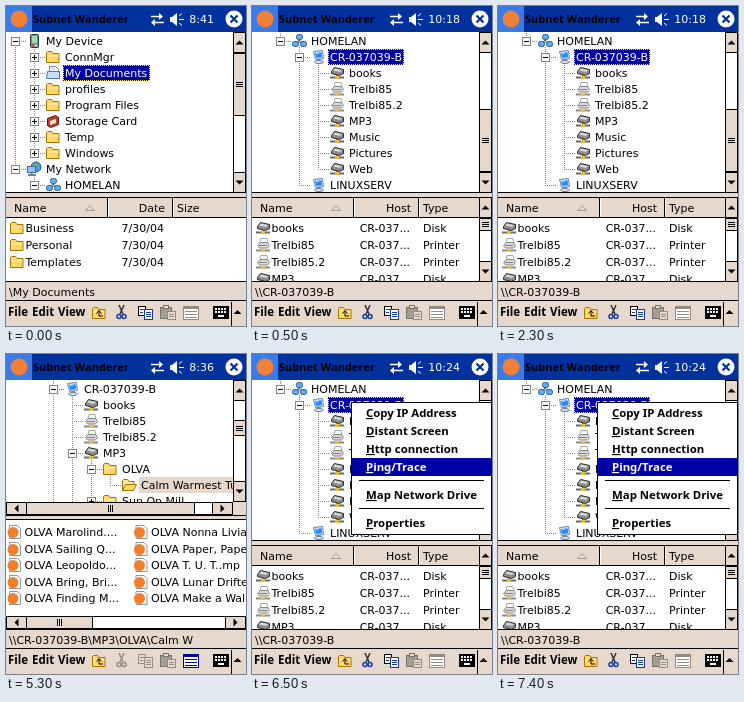
An HTML page for the animation above (8000 ms loop, 240 by 320 pixels).

```html
<!DOCTYPE html>
<html lang="en">
<head>
<meta charset="utf-8">
<title>Subnet Wanderer</title>
<style>
  html, body { margin: 0; width: 100%; height: 100%; overflow: hidden; background: #fff; }
  svg { display: block; }
  text { font: 11px "DejaVu Sans", sans-serif; white-space: pre; }
  .title, .bar, .menu { font-family: "Noto Sans", sans-serif; font-weight: 700; }
  .title { font-size: 11px; }
  .bar { font-size: 11.5px; }
  .menu { font-size: 11.4px; }
  .key { text-decoration: underline; }
  .end { text-anchor: end; }
  .crisp { shape-rendering: crispEdges; }
</style>
</head>
<body>
<svg id="stage" width="240" height="320" viewBox="0 0 240 320">
  <defs>
    <g id="folder">
      <path d="M1.5 13.5v-10l1-1h4l1.5 2h6v9z" fill="#ffd76b" stroke="#a57300"/>
      <path d="M2.5 7h11" stroke="#fff3b5"/>
    </g>
    <g id="open">
      <path d="M1.5 13.5v-10l1-1h4l1.5 2h5v3" fill="#ffe79c" stroke="#a57300"/>
      <path d="M1.5 13.5l3-6h11l-3 6z" fill="#ffd76b" stroke="#a57300"/>
    </g>
    <g id="docs">
      <path d="M4.5 8V1.5h6l3 3V8" fill="#fff" stroke="#6b84b5"/>
      <path d="M1.5 13.5l1-7h12v7z" fill="#c6dbff" stroke="#5273ad"/>
      <path d="M6 4h4" stroke="#9cb5de"/>
    </g>
    <g id="pda">
      <rect x="4.5" y="1.5" width="8" height="13" rx="1" fill="#8c8c94" stroke="#31313a"/>
      <rect x="6" y="3" width="5" height="7" fill="#9cdbb5"/>
      <path d="M6 12.5h2" stroke="#e73121" stroke-width="2"/>
      <path d="M9 12.5h2" stroke="#fff"/>
    </g>
    <g id="card">
      <path d="M2.5 5.5l8-3 3 2v7l-8 3-3-2z" fill="#c63929" stroke="#4a1810"/>
      <path d="M5 8l6-2v4l-6 2z" fill="#efe7de"/>
    </g>
    <g id="globe">
      <circle cx="10" cy="6" r="5" fill="#4a9cef" stroke="#185aa5"/>
      <path d="M7 4q3-3 5 0l-2 3zM12 8l2-2v3z" fill="#63bd52"/>
      <rect x="1.5" y="5.5" width="8" height="6" fill="#8cc6ff" stroke="#52637b"/>
      <path d="M2 14h8M5.5 12v2" stroke="#73848c" stroke-width="2"/>
    </g>
    <g id="group">
      <path d="M8 5v5M4 11L8 7l5 4" fill="none" stroke="#52637b"/>
      <g fill="#5aadf7" stroke="#315a8c">
        <rect x="5.5" y="1.5" width="6" height="5" rx="2"/>
        <rect x="1.5" y="8.5" width="6" height="5" rx="2"/>
        <rect x="9.5" y="8.5" width="6" height="5" rx="2"/>
      </g>
    </g>
    <g id="pc">
      <path d="M3.5 2.5l9-1 1 8-8 1z" fill="#d6e7ff" stroke="#6b84ad"/>
      <path d="M5 4l6.500-.8 .7 5-6 .8z" fill="#218cf7"/>
      <path d="M6 4.500l3-.4" stroke="#b5deff"/>
      <path d="M9 10v2" stroke="#6b7b9c" stroke-width="3"/>
      <ellipse cx="9" cy="13" rx="4.500" ry="1.500" fill="#dee7f7" stroke="#6b7b9c"/>
    </g>
    <g id="share">
      <path d="M2.5 6.500l3-4 9 2v4l-4 2-8-2z" fill="#8c8c8c" stroke="#292929"/>
      <path d="M4 5.500l2-2 7 1.500-2 2z" fill="#d6d6d6"/>
      <path d="M1 12.500h14M8 10v3" stroke="#6b6b6b" stroke-width="2"/>
      <path d="M6 12.500h4" stroke="#efbd31" stroke-width="3"/>
    </g>
    <g id="printer">
      <path d="M5 6l1-4.500h6L13 6" fill="#fff" stroke="#a5a5a5"/>
      <path d="M2.500 8.500l3-3h7l2 3-2 2.500h-8z" fill="#dedbd6" stroke="#848484"/>
      <path d="M4 8.500h8" stroke="#848484"/>
      <path d="M1 13.500h14" stroke="#8c8c84" stroke-width="2"/>
      <path d="M6 13.500h4" stroke="#efbd31" stroke-width="2"/>
    </g>
    <g id="song">
      <path d="M3.500 1.500h8l3 3v10h-11z" fill="#fff" stroke="#8c949c"/>
      <circle cx="7" cy="8.500" r="5.500" fill="#f0802c"/>
    </g>
  </defs>
</svg>
<script>
const FACE = '#e7d8ce', SHADE = '#848284', BLUE = '#00319c', PICK = '#0000a5';
const LOOP = 8000;
const BTN = 21; // scroll button length

const rect = (x, y, w, h, fill, more = '') =>
  `<rect class="crisp" x="${x}" y="${y}" width="${w}" height="${h}" fill="${fill}" ${more}/>`;
const box = (x, y, w, h, fill, stroke = '#000', more = '') =>
  rect(x + .5, y + .5, w - 1, h - 1, fill, `stroke="${stroke}" ${more}`);
const path = (d, stroke, more = '') => `<path d="${d}" fill="none" stroke="${stroke}" ${more}/>`;
const shape = (d, fill) => `<path d="${d}" fill="${fill}"/>`;
const text = (x, y, s, cls = '', fill = '') =>
  `<text x="${x}" y="${y}" class="${cls}"${fill && ` fill="${fill}"`}>${s}</text>`;
const icon = (id, x, y) => `<use href="#${id}" x="${x}" y="${y}"/>`;
const dots = d => path(d, SHADE, 'class="crisp" stroke-dasharray="1 1"');
const shift = (x, y, body) => `<g transform="translate(${x} ${y})">${body}</g>`;

let clips = 0;
function clip(x, y, w, h, body) {
  const id = 'clip' + clips++;
  return `<clipPath id="${id}"><rect x="${x}" y="${y}" width="${w}" height="${h}"/></clipPath>` +
    `<g clip-path="url(#${id})">${body}</g>`;
}

// Tree rows: level, icon, label, expander
const device = [
  [0, 'pda', 'My Device', '-'],
  [1, 'folder', 'ConnMgr', '+'],
  [1, 'docs', 'My Documents', '+'],
  [1, 'folder', 'profiles', '+'],
  [1, 'folder', 'Program Files', '+'],
  [1, 'card', 'Storage Card', '+'],
  [1, 'folder', 'Temp', '+'],
  [1, 'folder', 'Windows', '+'],
  [0, 'globe', 'My Network', '-'],
  [1, 'group', 'HOMELAN', '-'],
  [2, 'pc', 'CR-037039-B', '-'],
  [3, 'share', 'books'],
  [3, 'printer', 'Trelbi85'],
  [3, 'printer', 'Trelbi85.2'],
  [3, 'share', 'MP3'],
  [3, 'share', 'Music'],
  [3, 'share', 'Pictures'],
  [3, 'share', 'Web'],
  [2, 'pc', 'LINUXSERV']
];
const opened = device.slice();
opened.splice(14, 1,
  [3, 'share', 'MP3', '-'],
  [4, 'folder', 'OLVA', '-'],
  [5, 'open', 'Calm Warmest Tunes'],
  [4, 'folder', 'Sun On Mill', '+']);

function hasNext(rows, i, level) {
  const next = rows.slice(i + 1).find(r => r[0] <= level);
  return !!next && next[0] === level;
}

function tree(rows, from, bottom, picked, pickEnd, focus = true) {
  let out = '';
  rows.slice(from, from + 10).forEach(([level, pic, label, sign], k) => {
    const i = from + k, y = 27 + 16 * k, mid = y + 8, x = 9 + 19 * level;
    for (let l = 0; l < level; l++)
      if (hasNext(rows, i, l)) out += dots(`M${9.5 + 19 * l} ${y}v16`);
    if (i) out += dots(`M${x + .5} ${y}v8`);
    if (hasNext(rows, i, level)) out += dots(`M${x + .5} ${mid}v8`);
    out += dots(`M${x} ${mid + .5}h11`);
    if (sign === '-') out += dots(`M${x + 19.5} ${y + 14}v2`);
    if (sign) {
      out += box(x - 4, mid - 4, 9, 9, '#fff', SHADE) + rect(x - 2, mid, 5, 1, '#000');
      if (sign === '+') out += rect(x, mid - 2, 1, 5, '#000');
    }
    out += icon(pic, x + 11, y);
    const on = i === picked, tx = x + 31;
    if (on) {
      out += rect(tx - 2, y, pickEnd - tx + 2, 16, focus ? PICK : FACE);
      if (focus) out += box(tx - 2, y, pickEnd - tx + 2, 16, 'none', '#ffdf63', 'stroke-dasharray="1 1"');
    }
    out += text(tx, y + 12, label, '', on && focus ? '#fff' : '');
  });
  return clip(0, 26, 227, bottom - 26, out);
}

const arrow = (cx, cy, turn) =>
  `<path d="M-4 2h8l-4-4z" transform="translate(${cx} ${cy}) rotate(${turn})"/>`;

function vScroll(y, h, a, b) {
  const mid = (a + b) / 2 | 0;
  return box(227, y, 13, h, '#fff') +
    box(227, y, 13, BTN, FACE) + box(227, y + h - BTN, 13, BTN, FACE) + box(227, a, 13, b - a, FACE) +
    path(`M230 ${mid - 1.5}h7m-7 2h7m-7 2h7`, '#000', 'class="crisp"') +
    arrow(233.5, y + BTN / 2, 0) + arrow(233.5, y + h - BTN / 2, 180);
}

function hScroll(y, w, a, b) {
  const mid = (a + b) / 2 | 0;
  return box(0, y, w, 13, '#fff') +
    box(0, y, BTN, 13, FACE) + box(w - BTN, y, BTN, 13, FACE) + box(a, y, b - a, 13, FACE) +
    path(`M${mid - 1.5} ${y + 3}v7m2-7v7m2-7v7`, '#000', 'class="crisp"') +
    arrow(BTN / 2, y + 6.5, -90) + arrow(w - BTN / 2, y + 6.5, 90);
}

function titleBar(time) {
  const status = path('M145 10.5h10M148 16.5h10', '#fff', 'stroke-width="1.6"') +
    shape('M153 7l4 3.5-4 3.5zM149 13l-4 3.5 4 3.5z', '#fff') +
    shape('M164 11h2l5-4v13l-5-4h-2z', '#fff') +
    path('M173 13.5h5M173 10l3-2.5M173 17l3 2.5', '#fff');
  return rect(0, 0, 240, 26, BLUE) + rect(0, 0, 26, 26, '#3a7be7') +
    '<circle cx="13" cy="13" r="8.5" fill="#f08038"/>' +
    text(27, 17, 'Subnet Wanderer', 'title') +
    shift(7 * (4 - time.length), 0, status) +
    text(208, 17, time, 'end', '#fff') +
    '<circle cx="228" cy="13" r="8.5" fill="#fff"/>' +
    path('M224.5 9.500l7 7m0-7l-7 7', BLUE, 'stroke-width="2.2"');
}

// The edit buttons and the list button are never enabled together
function toolBar(editing) {
  const gray = '#948c84', ink = editing ? '#1839a5' : gray, page = editing ? '#fff' : FACE;
  const list = editing ? gray : '#0000a5';
  return rect(0, 295, 240, 25, FACE) + rect(0, 294, 240, 1, '#000') +
    text(2, 310, 'File', 'bar') + text(26, 310, 'Edit', 'bar') + text(52, 310, 'View', 'bar') +
    icon('folder', 85, 299) + path('M93 310v-5m-2.5 2.5L93 304.500l2.5 3M93 310h4', '#000') +
    path('M113 299l4 9M118 299l-4 9', editing ? '#31313a' : gray, 'stroke-width="1.5"') +
    `<g fill="none" stroke="${ink}" stroke-width="1.5"><circle cx="113" cy="310.500" r="2"/><circle cx="118" cy="310.500" r="2"/></g>` +
    box(132, 300, 8, 10, page, editing ? '#000' : gray) + box(138, 303, 9, 11, page, ink) +
    path('M134 303.500h4M134 306.500h3M140 306.500h5M140 308.500h5M140 310.500h5', ink) +
    box(154, 301, 12, 12, '#a59c94', '#73736b') + box(157, 299, 6, 4, FACE, '#73736b') +
    box(161, 305, 9, 9, FACE, gray) + path('M163 308.500h5M163 310.500h5', gray) +
    box(177, 300, 16, 14, '#fff', list) + rect(177, 300, 16, 3, list) +
    path('M179 305.500h12M179 308.500h12M179 311.500h12', list, 'class="crisp"') +
    box(207, 300, 16, 13, '#000') +
    path('M209 303h12M209 306h12', '#fff', 'stroke-width="2" stroke-dasharray="2 1"') +
    path('M212 310h6', '#fff', 'stroke-width="2"') +
    rect(225, 296, 1, 24, '#000') + arrow(231.5, 306, 0);
}

const pathBar = s => rect(0, 276, 240, 18, FACE) + rect(0, 275, 240, 1, '#000') + text(3, 290, s);

function header(mid, last, right) {
  let out = rect(0, 187, 240, 4, FACE) + rect(0, 186, 240, 1, '#000') + rect(0, 191, 240, 1, '#000') +
    rect(0, 192, right, 20, FACE) + rect(0, 211, right, 1, '#000');
  for (const x of [101, 166]) out += rect(x, 192, 1, 20, '#000') + rect(x + 1, 192, 1, 19, '#fff');
  return out + text(8, 206, 'Name') + text(159, 206, mid, 'end') + text(171, 206, last) +
    path('M79.5 204.500h9l-4.500-5z', '#a59c94');
}

function fileList(rows) {
  return clip(0, 212, 227, 63, rows.map(([pic, name, mid, last], i) => {
    const y = 226 + 17 * i;
    return icon(pic, 3, y - 12) + text(19.5, y, name) + text(158, y, mid, 'end') + text(171, y, last);
  }).join(''));
}

const day = '7/30/04', host = 'CR-037...';

function deviceView() {
  return titleBar('8:41') + tree(device, 0, 186, 2, 144) + vScroll(26, 161, 47, 110) +
    header('Date', 'Size', 240) +
    fileList(['Business', 'Personal', 'Templates'].map(s => ['folder', s, day, ''])) +
    pathBar('\\My Documents') + toolBar(true);
}

function hostView(time) {
  return titleBar(time) + tree(device, 9, 186, 10, 152) + vScroll(26, 161, 103, 166) +
    header('Host', 'Type', 227) +
    fileList([
      ['share', 'books', host, 'Disk'],
      ['printer', 'Trelbi85', host, 'Printer'],
      ['printer', 'Trelbi85.2', host, 'Printer'],
      ['share', 'MP3', host, 'Disk']
    ]) +
    vScroll(191, 85, 212, 225) + pathBar('\\\\CR-037039-B') + toolBar(true);
}

function musicView() {
  const columns = [
    ['Marolind....', 'Sailing Q...', 'Leopoldo...', 'Bring, Bri...', 'Finding M...'],
    ['Nonna Livia', 'Paper, Paper', 'T. U. T..mp', 'Lunar Drifter', 'Make a Walk']
  ];
  const songs = columns.map((names, c) => names.map((s, i) => {
    const x = 126.5 * c, y = 182 + 16.6 * i;
    return icon('song', x, Math.round(y) - 12) + text(x + 18.5, y, 'OLVA ' + s);
  }).join('')).join('');
  return titleBar('8:36') + tree(opened, 10, 148, 16, 227, false) +
    vScroll(26, 122, 66, 82) + rect(227, 148, 13, 13, FACE) + hScroll(148, 227, 20, 189) +
    rect(0, 161, 240, 5, FACE) + rect(0, 161, 240, 1, '#000') + rect(0, 165, 240, 1, '#000') +
    songs + hScroll(262, 240, 20, 87) +
    pathBar('\\\\CR-037039-B\\MP3\\OLVA\\Calm W') + toolBar(false);
}

function popup() {
  const items = [[63, 'Copy IP Address'], [81, 'Distant Screen'], [99, 'Http connection'],
    [117, 'Ping/Trace'], [145, 'Map Network Drive'], [173, 'Properties']];
  return box(99, 48, 141, 133, '#fff') + rect(100, 104, 139, 18, PICK) +
    rect(107, 126, 125, 1, '#000') + rect(107, 154, 125, 1, '#000') +
    items.map(([y, s]) => text(114, y, `<tspan class="key">${s[0]}</tspan>${s.slice(1)}`,
      'menu', y === 117 ? '#fff' : '')).join('');
}

// Start time and content of each view
const views = [
  [0, deviceView()],
  [500, hostView('10:18')],
  [3500, musicView()],
  [6500, hostView('10:24') + popup()]
];

const stage = document.getElementById('stage');
stage.insertAdjacentHTML('beforeend', views.map(v => `<g class="view">${v[1]}</g>`).join(''));
const groups = [...stage.querySelectorAll('.view')];

function draw() {
  const t = performance.now() % LOOP;
  const now = views.filter(v => v[0] <= t).length - 1;
  groups.forEach((g, i) => { g.style.display = i === now ? '' : 'none'; });
  requestAnimationFrame(draw);
}
draw();
</script>
</body>
</html>
```
